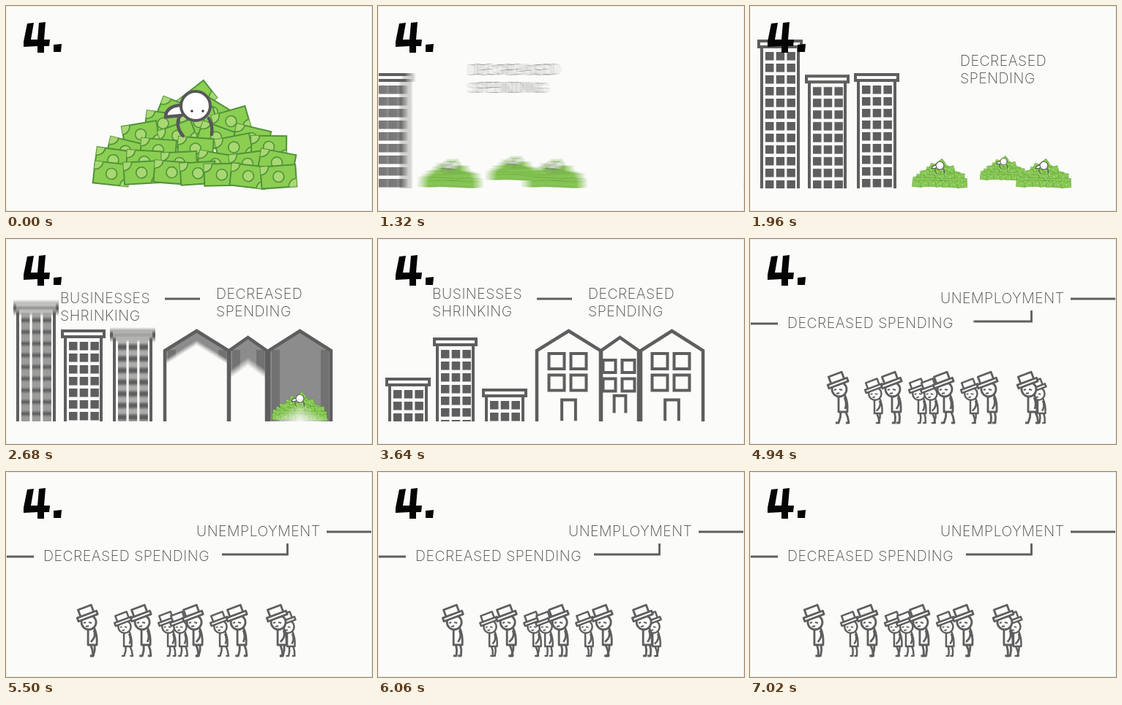
These frames come from a looping animation (500x281 px, 7100 ms). An HTML page with a canvas:

```html
<!DOCTYPE html>
<html lang="en">
<head>
<meta charset="utf-8">
<title>Spending cycle</title>
<style>
html, body { margin: 0; width: 100%; height: 100%; overflow: hidden; background: #fbfbf9; }
canvas { display: block; width: 100%; height: 100%; }
</style>
</head>
<body>
<canvas id="stage" width="500" height="281"></canvas>
<script>
const W = 500, H = 281, LOOP = 7100, STEP = 80, GROUND = 250;
const INK = '#5e5e5e', TYPE = '#484848', PAPER = '#fbfbf9';
const out = document.getElementById('stage').getContext('2d');
const buffer = document.createElement('canvas');
buffer.width = W;
buffer.height = H;
const c = buffer.getContext('2d');

// Timing helpers
const clamp = v => Math.max(0, Math.min(1, v));
const span = (t, from, to) => clamp((t - from) / (to - from));
const smooth = u => u * u * (3 - 2 * u);
const easeOut = u => 1 - (1 - u) ** 3;
const mix = (a, b, u) => a + (b - a) * u;
const glide = (t, from, to) => smooth(span(t, from, to));

// Drawing helpers
function at(x, y, scale, draw) {
  c.save();
  c.translate(x, y);
  c.scale(scale, scale);
  draw();
  c.restore();
}

function poly(points, fill, width, open) {
  c.beginPath();
  points.forEach(([x, y]) => c.lineTo(x, y));
  if (!open) c.closePath();
  if (fill) { c.fillStyle = fill; c.fill(); }
  if (width) { c.strokeStyle = INK; c.lineWidth = width; c.stroke(); }
}

const line = (...points) => poly(points, null, 2.8, true);
const box = (x, y, w, h, width) =>
  poly([[x, y], [x + w, y], [x + w, y + h], [x, y + h]], PAPER, width);

function pen(d, fill) {
  const path = new Path2D(d);
  if (fill) { c.fillStyle = fill; c.fill(path); }
  c.stroke(path);
}

function disc(x, y, r, fill, outlined) {
  c.beginPath();
  c.arc(x, y, r, 0, 7);
  c.fillStyle = fill;
  c.fill();
  if (outlined) c.stroke();
}

function label(text, x, y, alpha = 1) {
  c.globalAlpha = alpha;
  c.font = '200 19.5px Inter, "Open Sans", sans-serif';
  c.letterSpacing = '0.5px';
  c.fillStyle = TYPE;
  c.fillText(text, x - 1, y);
  c.globalAlpha = 1;
}

// Money
function note(x, y, tilt) {
  c.save();
  c.translate(x, y);
  c.rotate(tilt);
  c.fillStyle = '#8bce52';
  c.strokeStyle = '#4f9338';
  c.lineWidth = 2;
  c.beginPath();
  c.rect(-24, -15, 48, 30);
  c.fill();
  c.stroke();
  c.clip();
  c.lineWidth = 1.6;
  for (const k of [-1, 0, 1]) disc(24 * k, 15 * k, k ? 11 : 7.5, '#a9d873', true);
  c.restore();
}

// Each row is lower, wider and tidier than the one behind it
function heap() {
  let n = 0;
  for (let row = 0; row < 7; row++) {
    const half = Math.min(24 * row, 112);
    for (let i = 0; i <= row; i++, n++) {
      const x = 260 + half * (row ? 2 * i / row - 1 : 0) + 4 * Math.sin(n * 5);
      const y = 126 + 17.5 * row + 3 * Math.sin(n * 7 + 1);
      note(x, y, (0.66 - 0.09 * row) * Math.sin(n * n * 2.3 + 4.7));
    }
  }
}

function diver() {
  c.strokeStyle = '#57575a';
  c.lineWidth = 4.5;
  c.lineCap = 'round';
  pen('M240 136C226 136 218 143 218 152L240 150', '#fff');
  pen('M238 150C232 159 235 171 242 178M277 154C281 161 282 169 281 176');
  c.lineWidth = 4;
  disc(259, 137, 20, '#fff', true);
  disc(254, 144, 1.7, '#333');
  disc(269, 144, 1.7, '#333');
}

function pile(x, base, size = 1) {
  at(x, base, size / 3.7, () => {
    c.translate(-261, -249);
    heap();
    diver();
  });
}

// Buildings sink behind the ground line
function tower(x, w, top) {
  c.save();
  c.beginPath();
  c.rect(x - 10, -200, w + 20, 200 + GROUND);
  c.clip();
  box(x + 6, top + 8, w - 12, 260, 4);
  c.fillStyle = INK;
  for (let y = top + 17; y < GROUND; y += 16)
    for (let i = 0; i < 3; i++) c.fillRect(x + 11 + i * 14.7, y, 11.5, 11.5);
  box(x + 2, top + 2, w - 4, 8, 4);
  c.restore();
}

function towers(t) {
  const sink = glide(t, 2500, 3000);
  tower(10, 62, mix(46, 190, sink));
  tower(75, 61, 92 + 32 * glide(t, 1860, 2500) + 11 * glide(t, 2720, 3000));
  tower(142, 62, mix(92, 205, sink));
}

// Houses: a grey block shoots up, then wipes away from below
const gable = (h, dy) => [[h.l, GROUND], [h.l, 153 + dy], [h.mid, h.apex + dy], [h.r, 153 + dy], [h.r, GROUND]];
const makeHouse = (l, r, apex, win, start) => ({ l, r, apex, win, start, mid: (l + r) / 2 });
const left = makeHouse(217, 304, 126, 25, 2506);
const middle = makeHouse(305, 356, 135, 21, 2560);
const right = makeHouse(359, 444, 126, 25, 2666);

function house(h, t, money) {
  const height = GROUND - h.apex;
  const rise = height * (1 - easeOut(span(t, h.start - 190, h.start - 10)));
  const wipe = height * (1 - easeOut(span(t, h.start, h.start + 350)));
  const up = t > h.start - 190;
  c.save();
  c.beginPath();
  c.rect(h.l - 60, 0, h.r - h.l + 120, GROUND);
  c.clip();
  if (up) {
    poly(gable(h, rise), '#8c8c8c');
    c.save();
    c.clip();
    c.fillStyle = '#727272';
    for (const x of [h.l + 4, h.r - 14]) c.fillRect(x, 152 + rise, 11, 100);
    c.restore();
  }
  if (t < h.start + 350) money();
  if (up) {
    if (t > h.start) poly(gable(h, wipe), PAPER);
    poly(gable(h, rise), null, 4.5, true);
  }
  c.restore();
}

function pop(x, y, w, h, u, open) {
  if (u <= 0) return;
  at(x + w / 2, y + h / 2, easeOut(u), () => {
    const a = w / 2, b = h / 2;
    if (open) poly([[-a, b], [-a, 2 - b], [a, 2 - b], [a, b]], PAPER, 4, true);
    else box(2 - a, 2 - b, w - 4, h - 4, 4);
  });
}

function fittings(h, t, i) {
  const start = 2960 + i * 110, win = h.win;
  for (let k = 0; k < 4; k++) {
    const x = h.mid - win - 4 + (k % 2) * (win + 5);
    const y = h.apex + 29 + (k >> 1) * (win + 4.5);
    pop(x, y, win, win, span(t, start + 70 * k, start + 70 * k + 180));
  }
  const w = win * 0.75;
  pop(h.mid - w / 2, h.apex + win * 3.7, w, win * 1.23, span(t, start + 200, start + 400), true);
}

function street(t) {
  towers(t);
  if (t < 1900) pile(705, 249);
  house(middle, t, () => pile(347, 239, 0.85));
  house(left, t, () => pile(260, 249));
  house(right, t, () => pile(402, 249));
  [left, middle, right].forEach((h, i) => fittings(h, t, i));

  const drop = 13 * (1 - glide(t, 1320, 1960));
  label('DECREASED', 288, 81.5 + drop);
  label('SPENDING', 288, 106 + drop);
  const sink = 12 * (1 - glide(t, 2080, 3300));
  const show = span(t, 2040, 2440);
  label('BUSINESSES', 75, 81.5 + sink, show);
  label('SHRINKING', 75, 106 + sink, show);
  const len = 48 * glide(t, 1960, 2440);
  if (len) line([217, 82], [217 + len, 82]);
}

// Walkers lean left under tilted hats
function walker(x, size, phase, t) {
  const dt = t - 4940;
  const swing = Math.cos((dt / 900 + phase) * 2 * Math.PI);
  at(x - dt * 0.0159, 253, size, () => {
    c.lineCap = 'butt';
    c.lineJoin = 'round';
    for (const side of [-1, 1]) {
      const hip = 6 + side * 3, foot = hip + side * swing * 4;
      line([hip, -18], [(hip + foot) / 2 + 1.5, -9], [foot + 1, -1], [foot - 3, -1]);
    }
    c.lineWidth = 2.8;
    pen('M0 -40L8 -40Q13 -30 12 -16L0 -16Z', PAPER);
    pen(`M8 -36Q12 -28 ${6 + swing * 3} -20`);
    disc(1, -47, 10, PAPER, true);
    c.lineWidth = 2;
    pen('M-6 -46L-3 -47M1 -47L5 -46M-3 -41L1 -42');
    c.translate(-1, -56);
    c.rotate(-0.36);
    box(-9, -12, 19, 11, 2.8);
    box(-14, -2, 28, 5, 2.8);
  });
}

// Leader position, then offsets of the smaller companions
const groups = [[121], [194, -24], [265, -35, -19], [325, -24], [380, 13]];

function crowd(t) {
  groups.forEach(([x, ...others], i) => {
    const phase = (i % 2) / 4;
    others.forEach((dx, j) => walker(x + dx, 0.87, phase + 0.2 + j / 3, t));
    walker(x, 1, phase, t);
  });
}

function queue(t) {
  const grow = glide(t, 4100, 4500);
  line([565 - 127 * grow, 82], [565, 82]);
  label('UNEMPLOYMENT', 261, 88);
  label('DECREASED SPENDING', 52, 122, span(t, 4420, 4800));
  const tail = 38 * glide(t, 4560, 4840);
  if (tail) line([38, 116], [38 - tail, 116]);
  const run = 106 * easeOut(span(t, 4640, 5200));
  if (run) {
    const points = [[384.5, 98], [384.5, 98 + Math.min(run, 15)]];
    if (run > 15) points.push([401 - run, 113]);
    line(...points);
  }
  crowd(t);
}

function numeral() {
  poly([[29, 24], [38, 23], [34, 46], [43, 46], [45, 23], [54, 22], [52, 46], [60, 46],
    [59, 55], [52, 55], [52, 64], [43, 64], [43, 55], [24, 56], [24, 49]], '#050505');
  poly([[65, 53], [76, 52], [75, 63], [65, 63]], '#050505');
}

function scene(t) {
  c.setTransform(1, 0, 0, 1, 0, 0);
  c.fillStyle = PAPER;
  c.fillRect(0, 0, W, H);

  const pan = 500 * glide(t, 4100, 4840);
  if (pan < 500) {
    const zoom = mix(3.7, 1, glide(t, 930, 1290));
    const focus = mix(705, 261, smooth(span(t, 960, 1880) ** 0.555));
    at(261 + pan, 249, zoom, () => {
      c.translate(-focus, -249);
      street(t);
    });
  }
  if (pan > 0) at(pan - 500, 0, 1, () => queue(t));

  numeral();
  c.strokeStyle = '#ececea';
  c.lineWidth = 1;
  c.strokeRect(0.5, 0.5, W - 1, H - 1);
}

// The picture advances in steps, with two rests
function stepTime(t) {
  if (t < 1000) return 0;
  if (t >= 3640 && t < 4140) return 3640;
  const from = t < 3640 ? 1000 : 4140;
  return from + Math.floor((t - from) / STEP) * STEP;
}

// Motion blur: average several moments inside the shutter
function render(t) {
  const still = t === 0 || t === 3640;
  const count = still ? 1 : 12;
  for (let i = 0; i < count; i++) {
    scene(still ? t : t + ((i + 0.5) / count - 0.5) * 28);
    out.globalAlpha = 1 / (i + 1);
    out.drawImage(buffer, 0, 0);
  }
}

let last = -1;
const begin = performance.now();
function tick() {
  const t = stepTime((performance.now() - begin) % LOOP);
  if (t !== last) render(last = t);
  requestAnimationFrame(tick);
}
tick();
</script>
</body>
</html>
```
